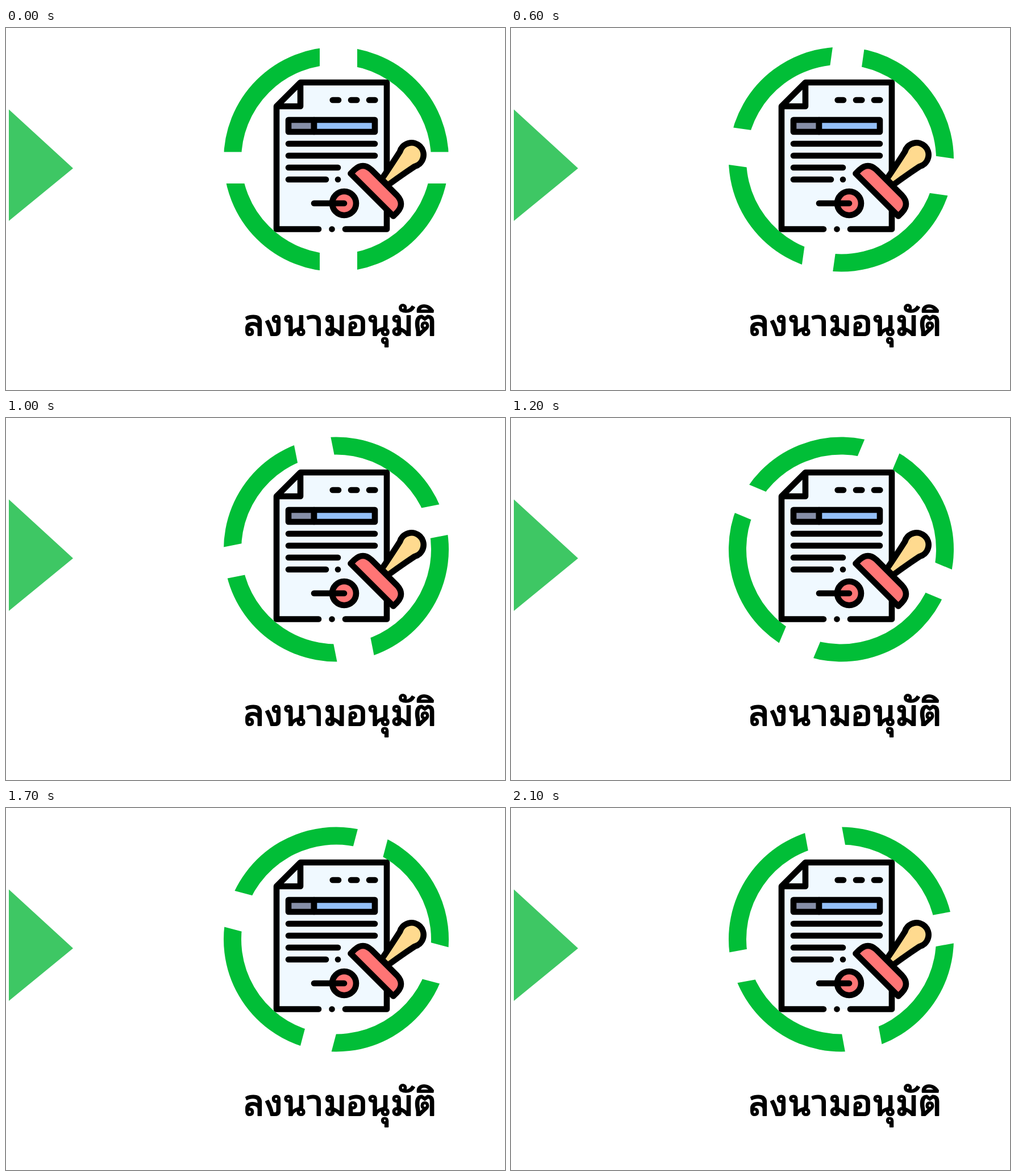
Recreate the animation shown at these times as an HTML page. Size 878x638 px, loop 2200 ms.

```html
<!DOCTYPE html>
<html lang="th">
<head>
<meta charset="utf-8">
<title>ลงนามอนุมัติ</title>
<style>
  html, body { margin: 0; width: 100%; height: 100%; overflow: hidden; background: #fff; }
  svg { display: block; width: 878px; height: 638px; }
  text {
    font: 500 63px "Noto Looped Thai", "Noto Sans Thai Looped", Loma, Waree, "Noto Sans Thai", "Noto Sans", sans-serif;
    stroke: #000; stroke-width: 2.2; stroke-linejoin: round;
  }
  .icon { stroke: #000; stroke-width: 10.6; stroke-linecap: round; stroke-linejoin: round; }
</style>
</head>
<body>
<svg viewBox="0 0 878 638">
  <path d="M5 143.5L118 247.3L5 340Z" fill="#3ec764"/>

  <!-- ring cut by an off-centre cross -->
  <g transform="translate(581 231.5)">
    <g id="ring">
      <circle r="182.5" fill="none" stroke="#01be37" stroke-width="31"/>
      <path d="M-29-205h66v410h-66zM-205-13h410v55.5h-410z" fill="#fff"/>
    </g>
  </g>

  <g class="icon" fill="none">
    <!-- paper -->
    <path d="M476 138L518 96H670V354.5H476Z" fill="#f0f9ff" stroke="none"/>
    <path d="M550 354.5H476V138L518 96H670V354.5H597M573.5 354.5h.01M476 138H518V96"/>
    <path d="M574.7 127h10.3M607 127h10.3M639 127h10.3"/>
    <path d="M497 162h45v21h-45z" fill="#868fa8"/>
    <path d="M542 162h107v21h-107z" fill="#94c0f7"/>
    <path d="M497 204H649M497 225H649M497 246H584M497 267H563M584 267h.01"/>
    <!-- seal -->
    <circle cx="595" cy="309" r="21" fill="#ff7575"/>
    <path d="M542 309H595"/>
    <!-- stamp -->
    <path d="M664 262Q677 243 693 218A21.2 21.2 0 1 1 719 244Q695 260 676 274" fill="#ffda8f"/>
    <path d="M606.5 256.5L613 250Q628 236 643 250L688 295Q702 310 688 325L681.5 331.5Z" fill="#ff7575"/>
  </g>

  <text x="588" y="542" text-anchor="middle">ลงนามอนุมัติ</text>
</svg>
<script>
  const STEP = 100, LOOP = 2200;
  // [step, degrees]: the spin hurries a little in the middle
  const keys = [[0, 0], [8, 130.7], [10, 168.8], [14, 236.7], [17, 284.8], [21, 349.6]];
  const ring = document.getElementById('ring');

  function angle(step) {
    const i = Math.max(1, keys.findIndex(k => k[0] >= step));
    const [s0, a0] = keys[i - 1], [s1, a1] = keys[i];
    return a0 + (a1 - a0) * (step - s0) / (s1 - s0);
  }

  const start = performance.now();
  function draw() {
    const t = (performance.now() - start) % LOOP;
    ring.setAttribute('transform', `rotate(${angle(Math.floor(t / STEP))})`);
    requestAnimationFrame(draw);
  }
  draw();
</script>
</body>
</html>
```
